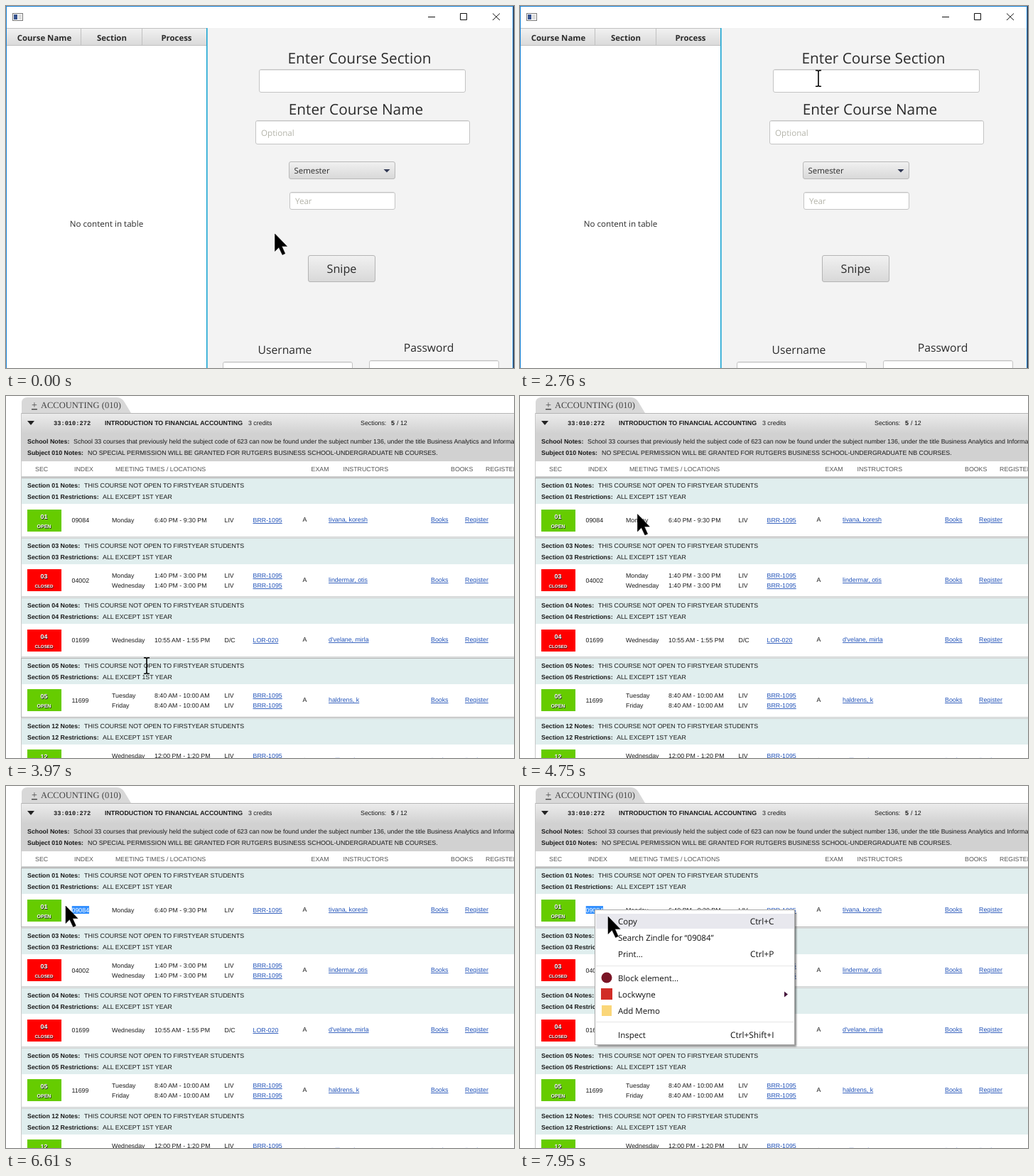
An HTML page that plays this animation: 715x510 px, repeating every 8000 ms.

```html
<!DOCTYPE html>
<html lang="en">
<head>
<meta charset="utf-8">
<title>Course sniper</title>
<style>
  html, body { margin: 0; width: 100%; height: 100%; overflow: hidden; background: #fff; }
  svg { display: block; width: 715px; height: 510px; }
  text { text-rendering: geometricPrecision; white-space: pre; }
  #app, #menu { font-family: "Open Sans", "Noto Sans", sans-serif; fill: #2b2b2b; }
  #menu { fill: #111; }
  #page { font: 8.83px "Liberation Sans", Arial, sans-serif; fill: #1a1a1a; }
  .b { font-weight: bold; }
  .hint { fill: #b4b4aa; }
  .link { fill: #2152b8; text-decoration: underline; }
  .badge { fill: #fff; font-weight: bold; text-anchor: middle; text-shadow: .7px .7px .6px #222; }
  .plus { text-decoration: underline; }
  .mid { text-anchor: middle; }
  .end { text-anchor: end; }
</style>
</head>
<body>
<svg id="stage" viewBox="0 0 715 510"></svg>
<script>
const LOOP = 8000, PAGE_AT = 3220, MENU_AT = 7400, COPY_AT = 7800;
const ROW = 84.66;

const text = (x, y, s, cls = '', size = '') =>
  `<text x="${x}" y="${y}" class="${cls}"${size && ` style="font-size:${size}px"`}>${s}</text>`;
const rect = (x, y, w, h, fill, extra = '') =>
  `<rect x="${x}" y="${y}" width="${w}" height="${h}" fill="${fill}" ${extra}/>`;
const line = (d, color, width = 1) =>
  `<path d="${d}" fill="none" stroke="${color}" stroke-width="${width}"/>`;
const gradient = (id, top, bottom) =>
  `<linearGradient id="${id}" x2="0" y2="1"><stop stop-color="${top}"/><stop offset="1" stop-color="${bottom}"/></linearGradient>`;

const box = (x, y, w, h, fill, stroke) =>
  rect(x + .5, y + .5, w - 1, h - 1, fill, `rx="2.5" stroke="${stroke}"`);
const field = (x, y, w, h) =>
  box(x, y, w, h, '#fff', '#c4c4c4') + line(`M${x + 2} ${y + 1.5}h${w - 4}`, '#e6e6e6');

function appWindow() {
  return rect(0, 0, 715, 510, '#f3f3f3') + rect(0, 0, 715, 31, '#fff') +
    rect(1, 31, 282, 479, '#fff') + rect(1, 31, 282, 25, 'url(#head)') +
    line('M1 31.5H283M1 55.5H283M105.5 32V56M191.5 32V56', '#c0c0c0') +
    line('M282.8 31V510', '#1aa5d2', 1.6) +
    line('M0 .5H714M.5 0V510M713.5 0V510', '#1883d7') + line('M714.5 0V510', '#4b3a3c') +
    rect(9.5, 10.5, 14, 10, '#fff', 'stroke="#777"') + rect(11, 12, 5, 7, '#35518c') +
    rect(17, 12, 5, 7, '#dcdcdc') +
    line('M594 15.5H604M639.5 10.5h9v9h-9zM685 10.5l10 9.5M695 10.5l-10 9.5', '#111') +
    text(54, 49, 'Course Name', 'b mid', 11.4) + text(149, 49, 'Section', 'b mid', 11.4) +
    text(240, 49, 'Process', 'b mid', 11.4) + text(141.5, 311, 'No content in table', 'mid', 11.6) +
    text(497.5, 81, 'Enter Course Section', 'mid', 20.8) + field(356, 89, 291, 33) +
    text(492.5, 153, 'Enter Course Name', 'mid', 20.8) + field(351, 161, 302, 34) +
    text(359, 183, 'Optional', 'hint', 11.6) +
    box(398, 219, 150, 25, 'url(#button)', '#b8b8b8') + text(405.5, 236, 'Semester', '', 11.4) +
    '<path d="M531.5 230h9l-4.5 4.5z" fill="#333a55"/>' +
    field(399, 262, 149, 25) + text(407, 279, 'Year', 'hint', 11.6) +
    box(425, 351, 95, 38, 'url(#button)', '#b4b4b4') + text(472.5, 376, 'Snipe', 'mid', 16.2) +
    text(392.5, 490, 'Username', 'mid', 15.7) + field(305, 501, 183, 33) +
    text(595, 487, 'Password', 'mid', 15.7) + field(511, 499, 183, 33);
}

function sectionRow([sec, index, open, meetings, teacher], i) {
  const y = Math.round(ROW * i);
  const badge = Math.floor(ROW * i);
  const first = meetings.length > 1 ? 171 : 178;
  return rect(22, y + 115, 693, 37, '#e0eeee') +
    line(`M22 ${y + 113.5}H715M22 ${y + 115.5}H715`, '#cfd3d3') + line(`M22 ${y + 114.5}H715`, '#e4e6e6') +
    text(30, y + 129, `Section ${sec} Notes:`, 'b') +
    text(110, y + 129, 'THIS COURSE NOT OPEN TO FIRSTYEAR STUDENTS') +
    text(30, y + 145, `Section ${sec} Restrictions:`, 'b') +
    text(136, y + 145, 'ALL EXCEPT 1ST YEAR') +
    rect(30, badge + 160, 48, 31, open ? '#66cc00' : '#ff0000') +
    text(53.5, badge + 173, sec, 'badge', 8.8) +
    text(53.5, badge + 186, open ? 'OPEN' : 'CLOSED', 'badge', open ? 7 : 6.2) +
    text(92.5, y + 178, index) +
    meetings.map(([day, hours, campus, room], k) => {
      const my = y + first + 14 * k;
      return text(149, my, day) + text(209, my, hours) + text(307.5, my, campus) + text(347.5, my, room, 'link');
    }).join('') +
    text(417.5, y + 177, 'A') + text(454, y + 177, teacher, 'link') +
    text(598, y + 177, 'Books', 'link') + text(646, y + 177, 'Register', 'link');
}

function schedulePage() {
  const brr = (day, hours) => [day, hours, 'LIV', 'BRR-1095'];
  const rows = [
    ['01', '09084', true, [brr('Monday', '6:40 PM - 9:30 PM')], 'tivana, koresh'],
    ['03', '04002', false, [brr('Monday', '1:40 PM - 3:00 PM'), brr('Wednesday', '1:40 PM - 3:00 PM')], 'lindermar, otis'],
    ['04', '01699', false, [['Wednesday', '10:55 AM - 1:55 PM', 'D/C', 'LOR-020']], "d'velane, mirla"],
    ['05', '11699', true, [brr('Tuesday', '8:40 AM - 10:00 AM'), brr('Friday', '8:40 AM - 10:00 AM')], 'haldrens, k'],
    ['12', '09085', true, [brr('Wednesday', '12:00 PM - 1:20 PM'), brr('Friday', '12:00 PM - 1:20 PM')], 'pellimar, j'],
  ];
  const heads = [[41, 'SEC'], [96, 'INDEX'], [154, 'MEETING TIMES / LOCATIONS'], [429.5, 'EXAM'],
    [474.5, 'INSTRUCTORS'], [626, 'BOOKS'], [675, 'REGISTER']];
  return rect(0, 0, 715, 510, '#fff') +
    '<path d="M22 24V10Q22 2 30 2H156Q163 2 167 9L176 24z" fill="#d8d8d8"/>' +
    `<g fill="#444" font-family="Liberation Serif, serif">${
      text(36, 17, '+', 'plus', 14)}${text(49, 17, 'ACCOUNTING (010)', '', 12.5)}</g>` +
    rect(22, 24, 693, 28, 'url(#bar)') + rect(22, 52, 693, 40, '#d1d1d1') +
    line('M22 24.5H715', '#b5b5b5') + '<path d="M30 35h10l-5 6z" fill="#222"/>' +
    `<g font-family="Liberation Mono, monospace">${text(67, 41, '33:010:272', 'b', 8.7)}</g>` +
    text(139, 41, 'INTRODUCTION TO FINANCIAL ACCOUNTING', 'b') + text(341, 41, '3 credits') +
    text(499, 41, 'Sections:') + text(542, 41, '5', 'b') + text(550, 41, '/ 12') +
    text(30, 67, 'School Notes:', 'b') +
    text(95, 67, 'School 33 courses that previously held the subject code of 623 can now be found under the subject number 136, under the title Business Analytics and Information') +
    text(30, 83, 'Subject 010 Notes:', 'b') +
    text(115, 83, 'NO SPECIAL PERMISSION WILL BE GRANTED FOR RUTGERS BUSINESS SCHOOL-UNDERGRADUATE NB COURSES.') +
    `<g fill="#555">${heads.map(([x, s]) => text(x, 106, s)).join('')}</g>` +
    rows.map(sectionRow).join('') +
    line('M22 115H715', '#c4c4c4', 2.5) + line('M21.5 24V510', '#c8c8c8') +
    rect(21.5, 115.5, 700, 83, 'none', 'stroke="#b2b2b2" id="hover"') +
    rect(22, 283.5, 693, 2, '#87eaea', 'id="glow"') +
    `<g clip-path="url(#picked)">${rect(92.5, 169, 24.5, 11, '#3390ff')}<g fill="#fff">${text(92.5, 178, '09084')}</g></g>`;
}

function contextMenu() {
  const items = [[195, 'Copy', 'Ctrl+C'], [218, 'Search Zindle for “09084”'], [241, 'Print...', 'Ctrl+P'],
    [275, 'Block element...'], [298, 'Lockwyne'], [321, 'Add Memo'], [355, 'Inspect', 'Ctrl+Shift+I']];
  return rect(109, 178, 280, 189, '#000', 'opacity=".45" filter="url(#soft)"') +
    rect(105.5, 174.5, 281, 190, '#fff', 'stroke="#a6a6a6"') +
    rect(107, 180, 279, 21, '#e8e8ee', 'id="copy"') +
    line('M107 253.5H385M107 332.5H385', '#e6e6e6') +
    '<circle cx="122" cy="270" r="7.5" fill="#7a1526"/>' +
    rect(114, 285, 16, 16, '#d12d27') + rect(115, 309, 14, 15, '#fad679') +
    '<path d="M372 289.5v8l5-4z" fill="#46163c"/>' +
    items.map(([y, label, key = '']) => text(138, y, label, '', 11.5) + text(357.5, y, key, 'end', 11.9)).join('');
}

document.getElementById('stage').innerHTML = `<defs>
  ${gradient('head', '#f2f2f2', '#d9d9d9')}${gradient('button', '#f1f1f1', '#d8d8d8')}${gradient('bar', '#ececec', '#d2d2d2')}
  <filter id="soft"><feGaussianBlur stdDeviation="1.3"/></filter>
  <clipPath id="picked"><rect id="range" y="168" width="60" height="13"/></clipPath></defs>
  <g id="app">${appWindow()}</g><g id="page">${schedulePage()}</g><g id="menu">${contextMenu()}</g>
  <path id="arrow" d="M0 0V24.5L5.5 19 10.5 29.5 14.3 27.8 9.7 17.6H17z" stroke="#000" stroke-width=".5"/>
  <path id="beam" d="M-4-11.2H-1.2L0-10 1.2-11.2H4M0-10V10M-4 11.2H-1.2L0 10 1.2 11.2H4" fill="none" stroke="#000" stroke-width="1.6"/>`;

// Pointer path: time, x, y, shape from then on
const path = [
  [0, 378.5, 321, 'arrow'], [620, 378.5, 321, 'arrow'], [880, 432, 245, 'arrow'], [1050, 407, 186, 'beam'],
  [1370, 407, 186, 'beam'], [1440, 408, 168, 'arrow'], [1590, 418.5, 130.5, 'arrow'],
  [1690, 418.5, 130.5, 'arrow'], [1910, 420, 119, 'beam'], [2150, 420, 119, 'beam'], [2370, 423, 97, 'beam'],
  [2460, 423, 97, 'beam'], [2750, 420, 102, 'beam'], [3219, 420, 102, 'beam'],
  [PAGE_AT, 202, 293, 'beam'], [3670, 202, 293, 'beam'], [3970, 198, 380, 'beam'],
  [4130, 198, 380, 'beam'], [4200, 192, 290, 'arrow'], [4345, 183, 166, 'arrow'], [4690, 183, 166, 'arrow'],
  [4750, 165.5, 166.5, 'arrow'], [4820, 156, 166.5, 'arrow'], [5000, 156, 166.5, 'arrow'],
  [5450, 118, 175, 'arrow'], [5590, 118, 175, 'arrow'], [5600, 118, 174, 'beam'], [5820, 118, 174, 'beam'],
  [5830, 117, 173, 'beam'], [5930, 117, 173, 'beam'], [6230, 88, 170, 'arrow'], [6380, 71, 170, 'arrow'],
  [6540, 71, 170, 'arrow'], [6610, 84, 169, 'arrow'], [6840, 93, 174, 'arrow'], [6920, 98, 170, 'beam'],
  [7190, 98, 170, 'beam'], [7250, 105, 174, 'beam'], [MENU_AT, 105, 174, 'arrow'], [7740, 105, 174, 'arrow'],
  [7945, 124, 184, 'arrow'], [LOOP, 124, 184, 'arrow'],
];

const el = Object.fromEntries(['app', 'page', 'menu', 'arrow', 'beam', 'hover', 'glow', 'copy', 'range']
  .map(id => [id, document.getElementById(id)]));
const show = (node, on) => node.setAttribute('display', on ? 'inline' : 'none');

function draw(now) {
  const t = now % LOOP;
  const i = path.findIndex(key => key[0] > t);
  const [t0, x0, y0, shape] = path[i - 1], [t1, x1, y1] = path[i];
  const k = (t - t0) / (t1 - t0);
  const x = x0 + (x1 - x0) * k, y = y0 + (y1 - y0) * k;

  show(el.app, t < PAGE_AT);
  show(el.page, t >= PAGE_AT);
  show(el.menu, t >= MENU_AT);
  show(el.copy, t >= COPY_AT);
  show(el.glow, t < 3740);

  const row = Math.max(0, Math.floor((y - 115) / ROW));
  el.hover.setAttribute('y', Math.round(ROW * row) + 115.5);

  const chars = t < 5930 ? 0 : t < 6380 ? Math.min(5, Math.round((117 - x) / 4.9)) : 5;
  el.range.setAttribute('x', 117 - 4.9 * chars);

  for (const name of ['arrow', 'beam']) {
    show(el[name], name === shape);
    el[name].setAttribute('transform', `translate(${x} ${y})`);
  }
  requestAnimationFrame(() => draw(performance.now()));
}
draw(0);
</script>
</body>
</html>
```
